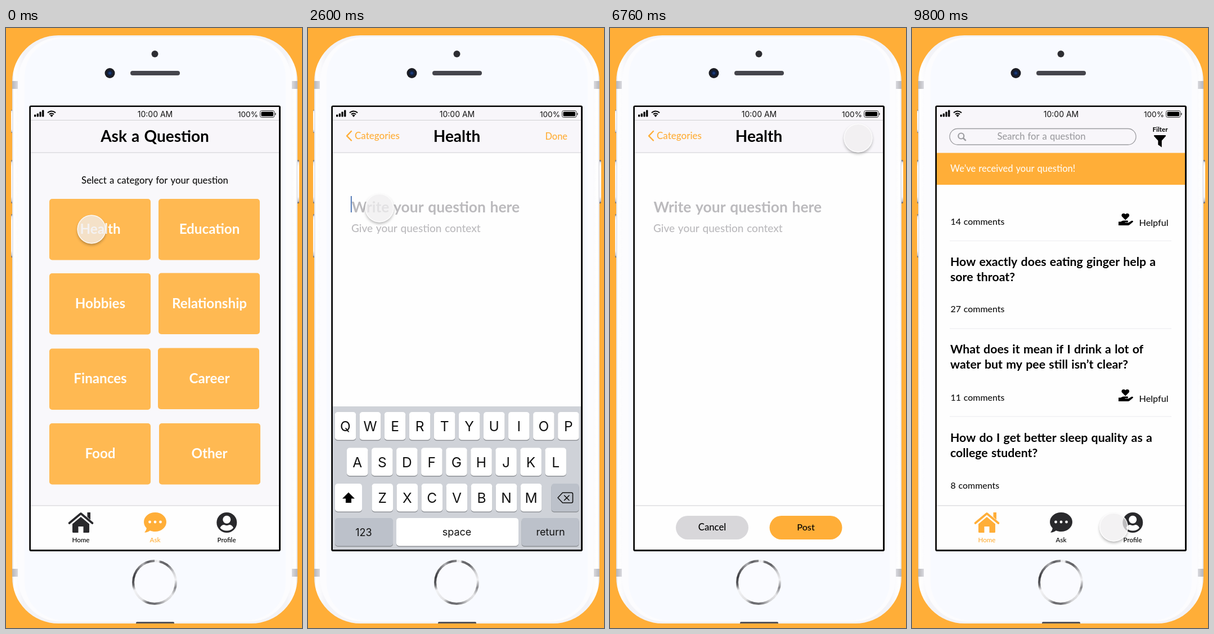
An HTML page with a canvas that plays this animation: 526 px wide and 1064 px high, repeating every 9.84 s.

```html
<!DOCTYPE html>
<html lang="en">
<head>
<meta charset="utf-8">
<title>Ask a Question</title>
<style>
html, body { margin: 0; width: 100%; height: 100%; overflow: hidden; background: #ffae38; }
canvas { display: block; width: 526px; height: 1064px; }
</style>
</head>
<body>
<canvas id="stage"></canvas>
<script>
const W = 526, H = 1064, LOOP = 9840;
const ORANGE = '#ffae38', INK = '#29292c', BAR = '#f8f6fa', PAPER = '#fefefe', LINE = '#d0d0d3';
const BRAND = 'Lato, "Open Sans", sans-serif', SYSTEM = 'Inter, Roboto, sans-serif';
const dpr = window.devicePixelRatio || 1;
let g;

function makeCanvas(c) {
  c.width = W * dpr;
  c.height = H * dpr;
  const ctx = c.getContext('2d');
  ctx.scale(dpr, dpr);
  return ctx;
}

function layer(draw) {
  const c = document.createElement('canvas');
  g = makeCanvas(c);
  draw();
  return c;
}

// Shape helpers
function box(x, y, w, h, fill, r = 0) {
  g.fillStyle = fill;
  g.beginPath();
  g.roundRect(x, y, w, h, r);
  g.fill();
}
function disc(x, y, r, fill) {
  g.fillStyle = fill;
  g.beginPath();
  g.arc(x, y, r, 0, Math.PI * 2);
  g.fill();
}
function shape(d, fill) {
  g.fillStyle = fill;
  g.fill(new Path2D(d));
}
function stroke(d, color, width, cap = 'round') {
  g.strokeStyle = color;
  g.lineWidth = width;
  g.lineCap = cap;
  g.lineJoin = 'round';
  g.stroke(new Path2D(d));
}
function rule(y, x = 44, w = 441, color = LINE) {
  box(x, y, w, 1, color);
}
function ramp(x0, y0, x1, y1, stops) {
  const grad = g.createLinearGradient(x0, y0, x1, y1);
  stops.forEach(([at, color]) => grad.addColorStop(at, color));
  return grad;
}

// Text helpers
function text(s, x, y, size, color, { bold = false, align = 'left' } = {}) {
  g.font = `${bold ? 700 : 500} ${size}px ${BRAND}`;
  g.wordSpacing = size * .05 + 'px';
  g.textAlign = align;
  g.fillStyle = color;
  g.fillText(s, x, y);
}
function sysText(s, x, y, size, color = '#111', align = 'center') {
  g.font = `400 ${size}px ${SYSTEM}`;
  g.wordSpacing = '0px';
  g.textAlign = align;
  g.fillStyle = color;
  g.fillText(s, x, y);
}

// Phone
function sideButton(x, y, h) {
  const grad = ramp(0, y, 0, y + h, [[0, '#55555a'], [.06, '#e9e9ee'], [.15, '#fff'], [.85, '#f4f4f8'], [.95, '#c2c2c8'], [1, '#4a4a50']]);
  box(x, y, 5, h, grad, 2);
}

function homeButton() {
  const ring = g.createConicGradient(-Math.PI / 2, 264, 983);
  [[0, '#e4e4e6'], [.03, '#f4f4f6'], [.045, '#6c6c70'], [.1, '#626266'], [.17, '#cfcfd2'], [.23, '#f1f1f3'],
   [.29, '#88888c'], [.35, '#e4e4e6'], [.41, '#d4d4d6'], [.49, '#727276'], [.55, '#6a6a6e'], [.6, '#e2e2e4'],
   [.69, '#f2f2f4'], [.73, '#646468'], [.79, '#3d3d41'], [.86, '#6e6e72'], [.91, '#b0b0b4'], [.95, '#5d5d61'], [1, '#88888b']]
    .forEach(([at, color]) => ring.addColorStop(at, color));
  disc(264, 983, 40, ring);
  disc(264, 983, 36, '#fafbff');
}

function drawPhone() {
  box(0, 0, W, H, ORANGE);
  sideButton(9, 145, 41);
  sideButton(9, 234, 77);
  sideButton(9, 330, 77);
  sideButton(516, 234, 77);
  box(11, 13, 507, 1043, ramp(11, 0, 518, 0, [
    [0, '#dcdce2'], [.006, '#ffffff'], [.02, '#fbfbfd'], [.04, '#f3f3f7'],
    [.96, '#f3f3f7'], [.98, '#fbfbfd'], [.994, '#ffffff'], [1, '#dcdce2']]), 82);
  for (const y of [94, 959]) {
    box(11, y, 10, 14, ramp(11, 0, 21, 0, [[0, '#b5b5ba'], [1, '#d9d9de']]));
    box(508, y, 10, 14, ramp(508, 0, 518, 0, [[0, '#d9d9de'], [1, '#b5b5ba']]));
  }
  box(22, 16, 485, 1037, '#fcfcfe', 76);
  box(33, 19, 464, 1031, '#f8faff', 68);
  box(231, 1053, 68, 3, '#55555a', [2, 2, 0, 0]);

  disc(264.5, 46, 6, '#2d2d32');
  disc(184.5, 80, 9, '#1c1d24');
  disc(184.5, 80, 5, '#11203f');
  disc(184.5, 80, 2.5, '#1b3a78');
  box(221, 76, 88, 8, '#45454c', 4);
  homeButton();
  box(41.3, 137.5, 446.7, 790.5, '#000', 3);
}

// Screen parts
function statusBar() {
  [4, 6, 9, 12].forEach((h, i) => box(50 + i * 4.7, 157.5 - h, 3.3, h, '#000', 1));
  g.strokeStyle = '#000';
  g.lineWidth = 2;
  g.lineCap = 'butt';
  for (const r of [5.6, 9.6]) {
    g.beginPath();
    g.arc(81, 157, r, -Math.PI * .76, -Math.PI * .24);
    g.stroke();
  }
  shape('M81 158 L78.3 154.8 Q81 152.8 83.7 154.8 Z', '#000');
  sysText('10:00 AM', 265, 158, 14);
  sysText('100%', 448, 157.5, 13.6, '#111', 'right');
  g.strokeStyle = '#333';
  g.lineWidth = 1;
  g.beginPath();
  g.roundRect(451.5, 146.5, 25.5, 12, 3);
  g.stroke();
  box(453.5, 148.5, 21.5, 8, '#000', 1.5);
  box(478, 150.5, 1.5, 4, '#444', 1);
}

function homeIcon(color) {
  shape('M144.5 859 h5.5 v13 l-5.5 -5 Z', color);
  stroke('M112.5 878 L133 861 L153.5 878', color, 3.6);
  shape('M118 879.5 L133 867 L148 879.5 V893.5 Q148 895 146.5 895 H137.5 V884 H128.5 V895 H119.5 Q118 895 118 893.5 Z', color);
}
function chatIcon(color) {
  shape('M265 859 C276 859 285 866.5 285 876 C285 885.5 276 893 265 893 C261.5 893 258.5 892.3 256 891.2 C252.5 893.7 249 894.8 246 894.6 C248 892.3 249.5 889.8 249.8 887 C246.8 884 245 880.2 245 876 C245 866.5 254 859 265 859 Z', color);
  [255.5, 265, 274.5].forEach(x => disc(x, 876, 2.4, '#fff'));
}
function profileIcon() {
  disc(392.3, 877, 18, INK);
  disc(392.3, 871.8, 7, '#fff');
  shape('M380.5 886.5 Q382.5 881 387.5 881 Q392.3 883.3 397 881 Q402 881 404 886.5 Q399.5 891.5 392.3 891.5 Q385 891.5 380.5 886.5 Z', '#fff');
}
function tabBar(active) {
  box(44, 847, 441, 78, PAPER);
  rule(846.5);
  const tint = name => name === active ? ORANGE : INK;
  homeIcon(tint('Home'));
  chatIcon(tint('Ask'));
  profileIcon();
  [['Home', 133], ['Ask', 265], ['Profile', 392]].forEach(([name, x]) =>
    text(name, x, 912, 11.6, name === active ? ORANGE : '#000', { align: 'center' }));
}

function header(title) {
  box(44, 140, 441, 81, BAR);
  statusBar();
  rule(163);
  rule(220.5);
  text(title, 264.5, 201.5, 28, '#000', { bold: true, align: 'center' });
}

function drawAsk() {
  box(44, 140, 441, 785, '#f9f8fb');
  header('Ask a Question');
  text('Select a category for your question', 264.5, 275.5, 16.7, '#111', { align: 'center' });
  const tiles = [
    ['Health', 77, 303], ['Education', 271, 303],
    ['Hobbies', 77, 435], ['Relationship', 271, 434.5],
    ['Finances', 77, 568.5], ['Career', 270, 567.5],
    ['Food', 77, 701], ['Other', 272, 701]];
  tiles.forEach(([name, x, y], i) => {
    box(x, y, 180, 108.5, '#ffb952', 5);
    text(name, i % 2 ? 361.5 : 167.5, 364.5 + 132.7 * (i >> 1), 24.2, '#fffdfa', { bold: true, align: 'center' });
  });
  tabBar('Ask');
}

function drawWrite() {
  box(44, 140, 441, 785, PAPER);
  header('Health');
  stroke('M77 183 L69 191.3 L77 199.5', ORANGE, 2.4);
  text('Categories', 83, 197, 17, ORANGE);
  text('Write your question here', 77.5, 327, 26.4, '#bbbabd', { bold: true });
  text('Give your question context', 77, 361.5, 19, '#bbbabd');
  rule(846.5);
  box(117, 865, 129, 42, '#d8d7da', 21);
  box(283.5, 865, 129, 42, ORANGE, 21);
  text('Cancel', 181.5, 891, 16.7, '#000', { align: 'center' });
  text('Post', 348, 891, 16.2, '#000', { align: 'center' });
}

function key(x, y, w, fill = '#fff') {
  box(x, y + 1.5, w, 49.5, '#8f9297', 5);
  box(x, y, w, 49.5, fill, 5);
}
function drawKeyboard() {
  const grey = '#bcc1ca';
  box(44, 671, 441, 254, '#cfd2d8');
  [['QWERTYUIOP', 47.7, 681], ['ASDFGHJKL', 69, 744.5], ['ZXCVBNM', 113.5, 808]].forEach(([row, x0, y]) =>
    [...row].forEach((ch, i) => {
      const x = x0 + i * 44.05;
      key(x, y, 37.5);
      sysText(ch, x + 18.7, y + 34, 24.5);
    }));
  key(48, 808, 48);
  shape('M72 823.5 L83 834.5 H77 V842 H67 V834.5 H61 Z', '#000');
  key(432.5, 808, 49, grey);
  stroke('M444 833 L452.5 824 H468 Q470.5 824 470.5 826.5 V839.5 Q470.5 842 468 842 H452.5 Z M455.5 829 L464 837.5 M464 829 L455.5 837.5', '#111', 1.6);
  key(48, 869, 103, grey);
  key(157, 869, 217);
  key(379.5, 869, 102, grey);
  sysText('123', 99, 901, 18);
  sysText('space', 264.5, 900, 18);
  sysText('return', 431, 900, 18);
}

function helpful(y) {
  shape(`M379.3 ${y - 7.5} l-6 -6 c-3 -4 2.5 -8.3 6 -4.2 c3.5 -4.1 9 .2 6 4.2 Z`, '#000');
  shape(`M367 ${y - 4.5} h4 q3 -2.3 6 -2 h6 q2.5 1.8 0 3 h-4.5 v.8 h6 l6 -3.6 q3 -.3 2.3 2 l-6.5 5.6 q-1 .7 -2.5 .7 H367 Z`, '#000');
  text('Helpful', 403.5, y + 3, 16.2, '#111');
}
function drawHome() {
  box(44, 140, 441, 785, PAPER);
  box(44, 140, 441, 82, BAR);
  statusBar();
  g.strokeStyle = '#9d9da1';
  g.lineWidth = 1.3;
  g.beginPath();
  g.roundRect(67, 178.5, 331, 28.5, 14.2);
  g.stroke();
  g.beginPath();
  g.arc(87.3, 191.5, 5, 0, Math.PI * 2);
  g.lineWidth = 2.2;
  g.stroke();
  stroke('M91.3 195.5 L95 199.2', '#9d9da1', 2.6);
  text('Search for a question', 230, 198, 16.6, '#9d9da1', { align: 'center' });
  text('Filter', 441, 184, 11.6, '#000', { bold: true, align: 'center' });
  shape('M431 190 H450 Q452 190.5 450.8 192 L443.8 199.8 V211.5 L437.3 207 V199.8 L430.2 192 Q429 190.5 431 190 Z', '#000');
  box(44, 221.5, 441, 56.5, ORANGE);
  text('We’ve received your question!', 68, 254.5, 16.5, '#fffaf2');

  const posts = [
    ['How exactly does eating ginger help a', 'sore throat?', 421.5],
    ['What does it mean if I drink a lot of', 'water but my pee still isn’t clear?', 576.5],
    ['How do I get better sleep quality as a', 'college student?', 733.5]];
  posts.forEach(([a, b, y]) => {
    text(a, 68, y, 21.3, '#000', { bold: true });
    text(b, 68, y + 27, 21.3, '#000', { bold: true });
  });
  [['14', 349], ['27', 504], ['11', 660.5], ['8', 817]].forEach(([n, y]) =>
    text(n + ' comments', 68.5, y, 15.9, '#111'));
  helpful(348);
  helpful(660);
  [377, 532.5, 688.5].forEach(y => rule(y, 67, 394, '#ececef'));
  tabBar('Home');
}

const phone = layer(drawPhone), ask = layer(drawAsk), write = layer(drawWrite),
      keyboard = layer(drawKeyboard), home = layer(drawHome);

// Motion
const clamp = v => Math.min(1, Math.max(0, v));
const ease = p => p < .5 ? 4 * p ** 3 : 1 - 4 * (1 - p) ** 3;
const span = (t, from, to) => clamp((t - from) / (to - from));

// Each move: start, end, x, y, bend of the path
const moves = [
  [1150, 1700, 127, 319, 1],
  [2950, 3450, 99, 351, 1],
  [4700, 5805, 441, 195, 1.42],
  [7000, 7700, 358.5, 885, 1]];

function pointerAt(t) {
  let x = 152, y = 357;
  for (const [from, to, tx, ty, bend] of moves) {
    const k = ease(span(t, from, to));
    x += (tx - x) * k;
    y += (ty - y) * k ** bend;
  }
  return [x, y];
}

function pointer(x, y) {
  const r = 25.5;
  g.save();
  g.beginPath();
  g.rect(0, 0, W, H);
  g.arc(x, y, r, 0, Math.PI * 2);
  g.clip('evenodd');
  g.shadowColor = 'rgba(0,0,0,.3)';
  g.shadowBlur = 5 * dpr;
  g.shadowOffsetY = 3 * dpr;
  disc(x, y, r - .5, '#fff');
  g.restore();
  disc(x, y, r, 'rgba(240,239,241,.745)');
  g.strokeStyle = 'rgba(255,255,255,.75)';
  g.lineWidth = 1.5;
  g.beginPath();
  g.arc(x, y, r - .7, 0, Math.PI * 2);
  g.stroke();
}

const view = makeCanvas(document.getElementById('stage'));

function put(c, alpha = 1, dy = 0) {
  if (alpha <= 0) return;
  g.globalAlpha = alpha;
  g.drawImage(c, 0, dy, W, H);
  g.globalAlpha = 1;
}

function frame() {
  const t = performance.now() % LOOP;
  g = view;
  put(phone);
  g.save();
  g.beginPath();
  g.rect(44, 140, 441, 785);
  g.clip();

  const toWrite = span(t, 1000, 1250), toHome = span(t, 8600, 8850);
  if (toWrite < 1) put(ask);
  put(write, toWrite);
  const up = ease(span(t, 2300, 2600)) - ease(span(t, 6150, 6450));
  if (up > 0) {
    g.globalAlpha = up;
    text('Done', 421.5, 198, 16.4, ORANGE);
    if (t < 4000) box(76, 298, 1.6, 29, '#2f5ea8');
    else box(76, 344, 1.6, 21.5, '#2f5ea8');
    put(keyboard, 1, (1 - up) * 254);
  }
  put(home, toHome);
  pointer(...pointerAt(t));
  g.restore();
  requestAnimationFrame(frame);
}
frame();
</script>
</body>
</html>
```
